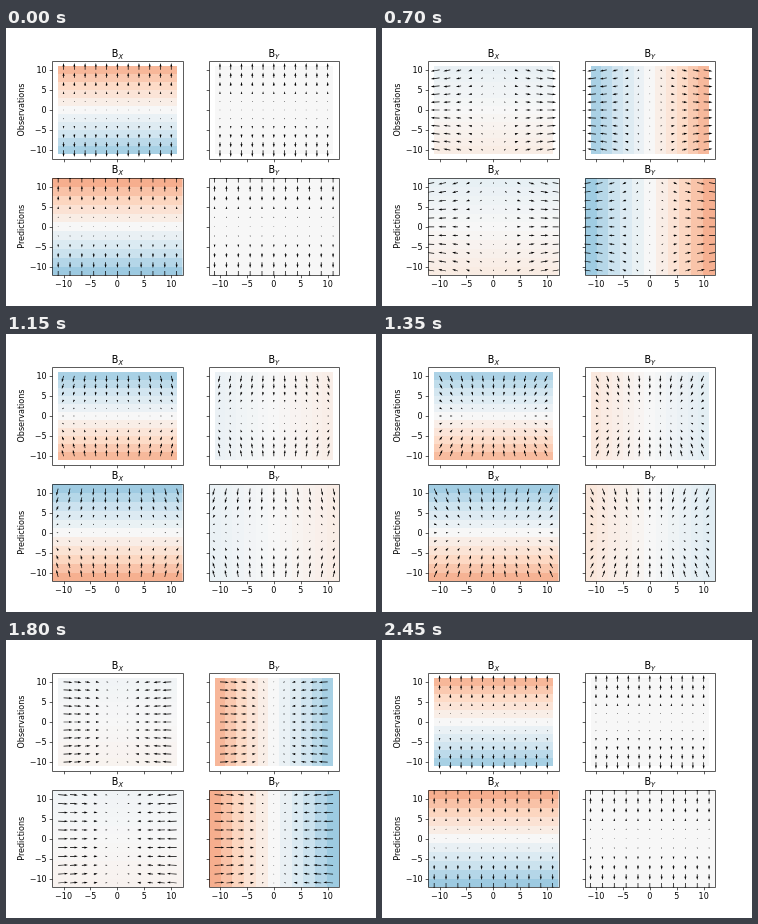
Animation of 370x278 px, one loop 2500 ms. Source, as an HTML page:

```html
<!DOCTYPE html>
<html lang="en">
<head>
<meta charset="utf-8">
<title>Field animation</title>
<style>
  html, body { margin: 0; width: 100%; height: 100%; overflow: hidden; background: #fff; }
  svg { display: block; width: 370px; height: 278px; }
  text { font-family: "DejaVu Sans", sans-serif; font-size: 8.03px; fill: #000; }
  .title { font-size: 9.64px; text-anchor: middle; }
  .sub { font-size: 6.75px; font-style: italic; }
  .line { fill: none; stroke: #000; stroke-width: .64; }
  .cell { shape-rendering: crispEdges; }
</style>
</head>
<body>
<svg id="stage" viewBox="0 0 370 278"></svg>
<script>
const STEP = 50, STEPS = 50, N = 11;
const W = 130.34, H = 97.3, LIMIT = 12.1;
const SX = W / (2 * LIMIT), SY = H / (2 * LIMIT);
const VMAX = 30;
const ARROW_SCALE = 6;          // field units per axis unit of arrow length
const SHAFT = 0.06 / N * W;
const TICKS = [-10, -5, 0, 5, 10];
// diverging colour ramp, one stop per 0.1 from 0.2 to 0.8
const RAMP = [[67, 147, 195], [146, 197, 222], [209, 229, 240], [247, 247, 247],
              [253, 219, 199], [244, 165, 130], [214, 96, 77]];
const stage = document.getElementById('stage');

function add(parent, tag, attrs, text) {
  const el = document.createElementNS('http://www.w3.org/2000/svg', tag);
  for (const key in attrs) el.setAttribute(key, attrs[key]);
  if (text !== undefined) el.textContent = text;
  parent.appendChild(el);
  return el;
}

const snap = v => Math.floor(v + 0.5) + 0.5;
const label = v => (v < 0 ? '\u2212' : '') + Math.abs(v);

function color(value) {
  const p = 3 + value / VMAX * 5;
  const i = Math.max(0, Math.min(5, Math.floor(p)));
  return `rgb(${RAMP[i].map((c, k) => Math.round(c + (RAMP[i + 1][k] - c) * (p - i)))})`;
}

function makePanel(col, row) {
  const x = col ? 202.66 : 46.25, y = row ? 150.12 : 33.36;
  const cx = x + W / 2, cy = y + H / 2;
  const gap = row ? 2.2 : 2, half = gap * N / 2;
  const grid = Array.from({ length: N }, (_, i) => (i - 5) * gap);
  const left = snap(x), right = snap(x + W), top = snap(y), bottom = snap(y + H);
  const id = `clip${col}${row}`;
  const clip = add(stage, 'clipPath', { id });
  add(clip, 'rect', { x, y, width: W, height: H });
  const group = add(stage, 'g', { 'clip-path': `url(#${id})` });

  const cells = grid.map(v => add(group, 'rect', col
    ? { class: 'cell', x: cx + (v - gap / 2) * SX, y: cy - half * SY,
        width: gap * SX, height: 2 * half * SY }
    : { class: 'cell', x: cx - half * SX, y: cy - (v + gap / 2) * SY,
        width: 2 * half * SX, height: gap * SY }));
  const arrows = add(group, 'path', {});

  let ticks = '';
  for (const v of TICKS) {
    const tx = cx + v * SX, ty = cy - v * SY;
    ticks += `M${snap(tx)} ${bottom}v2.8M${left} ${snap(ty)}h-2.8`;
    if (row) add(stage, 'text', { x: tx, y: 259, 'text-anchor': 'middle' }, label(v));
    if (!col) add(stage, 'text', { x: x - 5.6, y: Math.round(ty + 3), 'text-anchor': 'end' }, label(v));
  }
  add(stage, 'path', { class: 'line', d: `M${left} ${top}H${right}V${bottom}H${left}Z${ticks}` });

  const title = add(stage, 'text', { class: 'title', x: cx, y: Math.round(y - 4.8) }, 'B');
  add(title, 'tspan', { class: 'sub', dy: 1.7 }, col ? 'Y' : 'X');
  if (!col) {
    add(stage, 'text', { 'text-anchor': 'middle', transform: `translate(18.3 ${cy}) rotate(-90)` },
      row ? 'Predictions' : 'Observations');
  }
  return { col, cx, cy, grid, cells, arrows };
}

// outline of one arrow with its tail at (x, y), pointing along (dx, dy) pixels
function arrow(x, y, dx, dy) {
  const angle = Math.atan2(dy, dx), c = Math.cos(angle), s = Math.sin(angle);
  const length = Math.hypot(dx, dy) / SHAFT;
  const L = Math.max(length, 5), k = SHAFT * Math.min(1, length / 5);
  let pts;
  if (length < 1) {
    pts = [0, 1, 2, 3, 4, 5].map(i =>
      [Math.cos(i * Math.PI / 3) * SHAFT / 2, Math.sin(i * Math.PI / 3) * SHAFT / 2]);
  } else {
    pts = [[0, -.5], [L - 4.5, -.5], [L - 5, -1.5], [L, 0], [L - 5, 1.5], [L - 4.5, .5], [0, .5]]
      .map(([a, b]) => [a * k, b * k]);
  }
  return 'M' + pts.map(([a, b]) =>
    `${(x + a * c - b * s).toFixed(2)} ${(y + a * s + b * c).toFixed(2)}`).join('L') + 'Z';
}

function drawPanel(p, ax, ay) {
  p.cells.forEach((cell, i) => cell.setAttribute('fill', color(p.grid[i] * (p.col ? ax : ay))));
  let d = '';
  for (const v of p.grid) for (const u of p.grid) {
    const px = u * SX, py = -v * SY;
    d += arrow(p.cx + px, p.cy + py, px * ax / ARROW_SCALE, py * ay / ARROW_SCALE);
  }
  p.arrows.setAttribute('d', d);
}

const panels = [[0, 0], [1, 0], [0, 1], [1, 1]].map(([c, r]) => makePanel(c, r));
const start = performance.now();
let last = -1;

function render() {
  const step = Math.floor((performance.now() - start) / STEP) % STEPS;
  if (step !== last) {
    last = step;
    const phase = 2 * Math.PI * step / (STEPS - 1);
    for (const p of panels) drawPanel(p, Math.sin(phase), Math.cos(phase));
  }
  requestAnimationFrame(render);
}
render();
</script>
</body>
</html>
```
